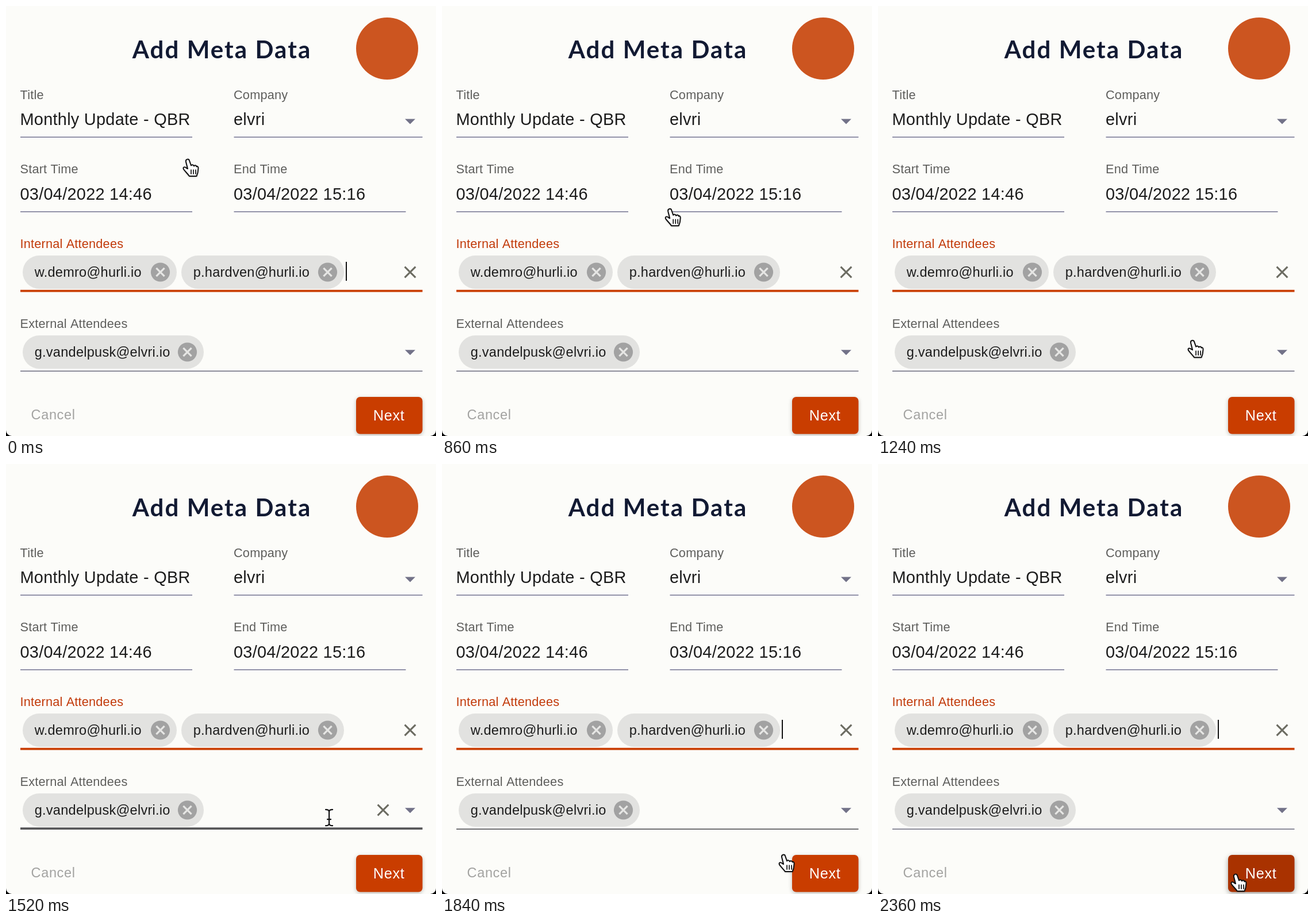
An HTML page with a canvas that plays this animation: 748x748 px, repeating every 2.46 s.

```html
<!DOCTYPE html>
<html lang="en">
<head>
<meta charset="utf-8">
<title>Add Meta Data</title>
<style>
  html, body { margin: 0; width: 100%; height: 100%; overflow: hidden; }
  canvas { display: block; }
</style>
</head>
<body>
<canvas id="stage" width="748" height="748"></canvas>
<script>
const ctx = document.getElementById('stage').getContext('2d');
const LOOP = 2460;
const SANS = '"Liberation Sans", Arial, sans-serif';
const ORANGE = '#c93d00', INK = '#1c1c1c', LABEL = '#5e5e5c', LINE = '#85859f', ICON = '#6c6c62';
const HOVER_ON = 1400, HOVER_OFF = 1690, BUTTON_ON = 2120;
const CARET_OFF = 200, CARET_ON = 1680;

// time, x, y of the pointer
const path = [
  [0, 315, 267], [400, 315, 269], [860, 395, 353], [1240, 546, 582],
  [1520, 562, 615], [1840, 593, 680], [2360, 621, 714]
];

const hand = new Path2D(`M-2 4C-3-1 3-2 4 2L7 10.5C8 8.5 11 9 12 11.5C13 9.5 16 10 16.5 12.5
  C17 11 19.5 12 19.5 15L18.5 23L16.5 29H4C1 25-3 21-6 17C-8 13-4 12-1 15L1 16Z`);
const handLines = new Path2D('M7 18V25M11 18V25M15 18V25');
const beam = new Path2D('M-6-14Q0-14 0-10V10Q0 14-6 14M6-14Q0-14 0-10M0 10Q0 14 6 14M-3 3H3');

const clamp = v => Math.max(0, Math.min(1, v));
const ease = v => { v = clamp(v); return v * v * (3 - 2 * v); };
const lerp = (a, b, k) => a + (b - a) * k;
const mix = (a, b, k) => `rgb(${a.map((v, i) => Math.round(lerp(v, b[i], k)))})`;

function slope(i, axis) {
  const step = j => (path[j + 1][axis] - path[j][axis]) / (path[j + 1][0] - path[j][0]);
  if (i === 0 || i === path.length - 1) return 0;
  const a = step(i - 1), b = step(i);
  return a * b > 0 ? 2 * a * b / (a + b) : 0;
}

function pointerAt(t, axis) {
  const last = path.length - 1;
  if (t >= path[last][0]) return path[last][axis];
  let i = 0;
  while (t >= path[i + 1][0]) i++;
  const span = path[i + 1][0] - path[i][0], u = (t - path[i][0]) / span;
  return lerp(path[i][axis], path[i + 1][axis], ease(u))
    + span * u * (1 - u) * ((1 - u) * slope(i, axis) - u * slope(i + 1, axis));
}

function text(str, x, y, size, color = INK, spacing = size * 0.0094, font = SANS, weight = 400) {
  ctx.font = `${weight} ${size}px ${font}`;
  ctx.letterSpacing = spacing + 'px';
  ctx.fillStyle = color;
  ctx.fillText(str, x, y);
}

function box(x, y, w, h, color, r = 0) {
  ctx.fillStyle = color;
  ctx.beginPath();
  ctx.roundRect(x, y, w, h, r);
  ctx.fill();
}

function disc(x, y, r, color) {
  ctx.fillStyle = color;
  ctx.beginPath();
  ctx.arc(x, y, r, 0, Math.PI * 2);
  ctx.fill();
}

function cross(x, y, half, width, color) {
  ctx.strokeStyle = color;
  ctx.lineWidth = width;
  ctx.beginPath();
  for (const s of [-1, 1]) {
    ctx.moveTo(x - half, y - s * half);
    ctx.lineTo(x + half, y + s * half);
  }
  ctx.stroke();
}

function arrow(x, y) {
  ctx.fillStyle = '#727288';
  ctx.beginPath();
  ctx.moveTo(x - 9, y);
  ctx.lineTo(x + 9, y);
  ctx.lineTo(x, y + 9);
  ctx.fill();
}

function field(label, value, x, y, width) {
  text(label, x - 0.5, y, 21.7, LABEL);
  text(value, x - 0.5, y + 45.8, 28.9);
  box(x, y + 65.7, width, 1.8, LINE);
}

function chip(email, x, y, width) {
  box(x, y, width, 58, '#e2e2e0', 29);
  text(email, x + 20.7, y + 36.6, 23.5, INK, 0.271);
  disc(x + width - 28.5, y + 29, 16.6, '#a2a2a2');
  cross(x + width - 28.5, y + 29, 7.1, 3.3, '#e6e6e4');
}

function drawForm(t) {
  box(0, 0, 748, 748, '#000');
  box(0, 0, 748, 748, '#fcfcf9', [0, 0, 10, 10]);

  ctx.textAlign = 'center';
  text('Add Meta Data', 375.5, 91, 42, '#121a33', 2.1, 'Lato, sans-serif', 700);
  ctx.textAlign = 'left';
  disc(663, 74, 54, '#cc5520');

  field('Title', 'Monthly Update - QBR', 25, 161.5, 299);
  field('Company', 'elvri', 396.5, 161.5, 328);
  field('Start Time', '03/04/2022 14:46', 25, 291.2, 299);
  field('End Time', '03/04/2022 15:16', 396.5, 291.2, 299);
  arrow(703, 196.5);

  text('Internal Attendees', 24.5, 421.2, 21.7, '#c23a0a');
  chip('w.demro@hurli.io', 29, 434, 268);
  chip('p.hardven@hurli.io', 305, 434, 283);
  cross(703, 463, 9.4, 3, ICON);
  box(25, 493.8, 699.5, 3.6, ORANGE);
  if (t < CARET_OFF || t >= CARET_ON) box(591, 445, 2, 33, '#111');

  const hovered = t >= HOVER_ON && t < HOVER_OFF;
  const glow = clamp((t - HOVER_ON) / 200) * (1 - clamp((t - HOVER_OFF) / 300));
  text('External Attendees', 24.5, 560, 21.7, LABEL);
  chip('g.vandelpusk@elvri.io', 29, 573, 315);
  if (hovered) cross(656, 602, 9.4, 3, ICON);
  arrow(703, 598.3);
  box(25, hovered ? 632.3 : 634.2, 699.5, hovered ? 3.6 : 1.8,
    mix([125, 125, 142], [60, 60, 52], glow));

  const press = ease((t - BUTTON_ON) / 200);
  text('Cancel', 43.5, 719.3, 23.5, '#a3a3a1', 0.67);
  ctx.save();
  ctx.shadowColor = `rgba(0,0,0,${lerp(0.25, 0.35, press)})`;
  ctx.shadowBlur = lerp(7, 10, press);
  ctx.shadowOffsetY = lerp(2, 3, press);
  box(609, 680, 115.5, 64.5, mix([201, 61, 0], [169, 50, 0], press), 7);
  ctx.restore();
  text('Next', 638.7, 721, 25.3, '#fff', 0.72);
}

function drawPointer(t) {
  ctx.save();
  ctx.translate(pointerAt(t, 1), pointerAt(t, 2));
  ctx.lineJoin = ctx.lineCap = 'round';
  if (t >= HOVER_ON && t < HOVER_OFF) {
    for (const [color, width] of [['#fff', 5], ['#111', 2.2]]) {
      ctx.strokeStyle = color;
      ctx.lineWidth = width;
      ctx.stroke(beam);
    }
  } else {
    ctx.shadowColor = 'rgba(0,0,0,.3)';
    ctx.shadowBlur = 3;
    ctx.shadowOffsetY = 1.5;
    ctx.fillStyle = '#fff';
    ctx.fill(hand);
    ctx.shadowColor = 'transparent';
    ctx.strokeStyle = '#111';
    ctx.lineWidth = 2;
    ctx.stroke(hand);
    ctx.lineWidth = 1.7;
    ctx.stroke(handLines);
  }
  ctx.restore();
}

function draw() {
  const t = performance.now() % LOOP;
  drawForm(t);
  drawPointer(t);
  requestAnimationFrame(draw);
}
draw();
</script>
</body>
</html>
```
